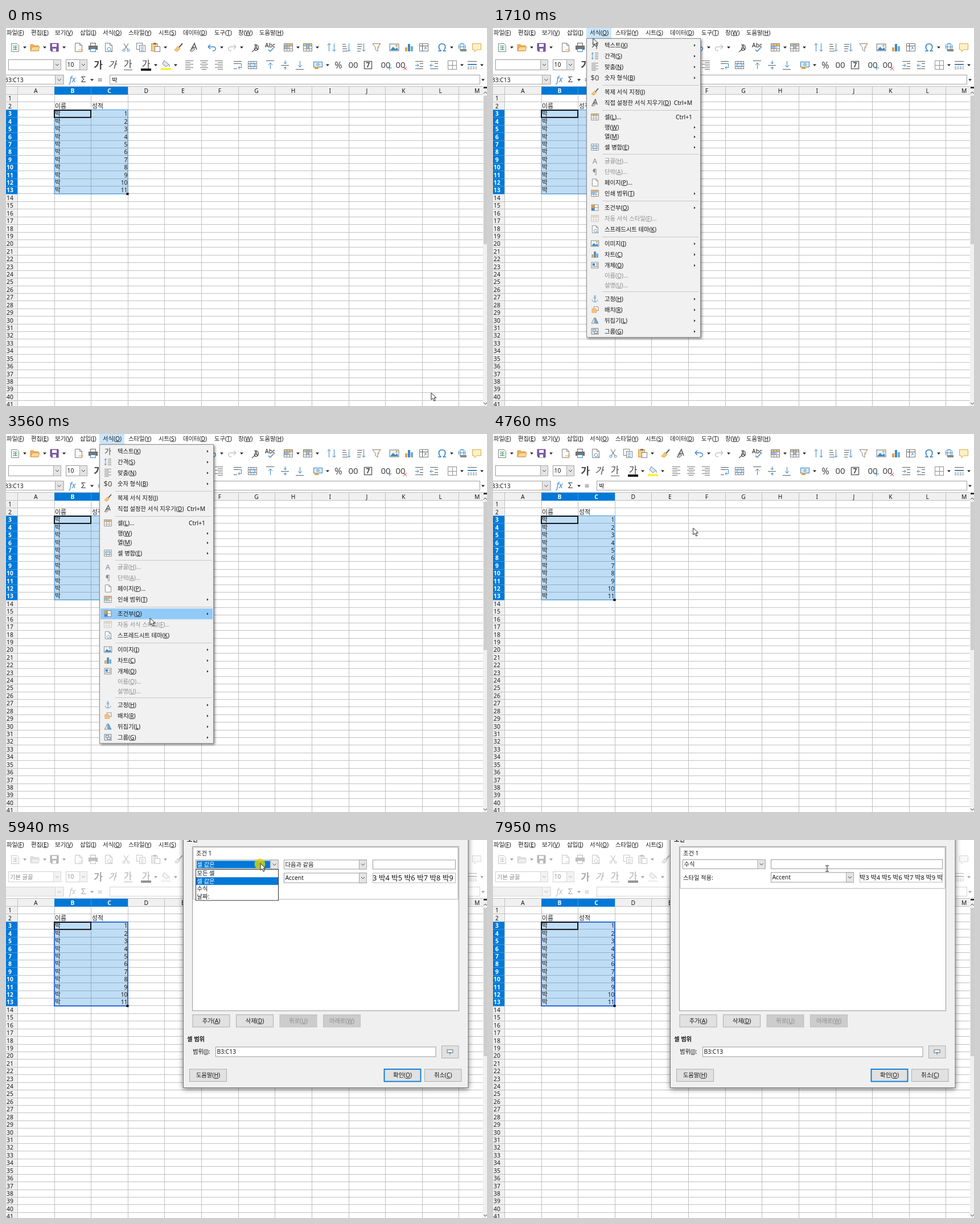
Write an HTML page that moves like this. It is 845 by 663 pixels and loops after 8000 ms.

```html
<!DOCTYPE html>
<html lang="ko">
<head>
<meta charset="utf-8">
<title>조건부 서식</title>
<style>
html, body { margin: 0; width: 845px; height: 663px; overflow: hidden; background: #fff; }
svg { display: block; }
text { font: 10.3px "Noto Sans", "Noto Sans CJK KR", sans-serif; fill: #161616; white-space: pre; }
.u { text-decoration: underline; }
.b { font-weight: 700; }
.w { fill: #fff; }
.dim { fill: #8d8d8d; }
.cell { font-size: 10.8px; }
.mid { text-anchor: middle; }
.end { text-anchor: end; }
.shade { filter: drop-shadow(2px 2px 2px #0007); }

/* every part shares one 8 s clock */
.t { animation: 8s step-end infinite; }
#bar { animation-name: disable; }
#live { animation-name: live; }
#idle { animation-name: idle; }
#thick { animation-name: thick; }
#tab { animation-name: tab; }
#menu { animation-name: menu; }
#hover { animation-name: hover; }
#sub { animation-name: sub; }
#subHover { animation-name: subHover; }
#dialog { animation-name: dialog; animation-timing-function: linear; transform-origin: 561.5px 158px; }
#before { animation-name: before; }
#after { animation-name: after; }
#list { animation-name: list; }
#s0 { animation-name: s0; }
#s1 { animation-name: s1; }
#s2 { animation-name: s2; }
#pointer { animation-name: move; animation-timing-function: linear; }
#click { animation-name: click; }
#arrow { animation-name: arrow; }
#beam { animation-name: beam; }

@keyframes disable { 0% { filter: none } 66%, 100% { filter: grayscale(1) opacity(.45) } }
@keyframes live { 0% { opacity: 1 } 66%, 100% { opacity: 0 } }
@keyframes idle { 0% { opacity: 0 } 66%, 100% { opacity: 1 } }
@keyframes thick { 0% { opacity: 0 } 62.2%, 100% { opacity: 1 } }
@keyframes tab { 0% { opacity: 0 } 13.8% { opacity: 1 } 55.5%, 100% { opacity: 0 } }
@keyframes menu { 0% { opacity: 0 } 17.4% { opacity: 1 } 55.5%, 100% { opacity: 0 } }
@keyframes sub { 0% { opacity: 0 } 48% { opacity: 1 } 55.5%, 100% { opacity: 0 } }
@keyframes subHover { 0% { opacity: 0 } 49.6%, 100% { opacity: 1 } }
@keyframes hover {
  0% { transform: translateY(-99px) }
  22% { transform: translateY(30px) }
  22.8% { transform: translateY(49px) }
  23.2% { transform: translateY(68px) }
  23.5% { transform: translateY(87px) }
  23.9% { transform: translateY(112px) }
  24.2% { transform: translateY(131px) }
  24.5% { transform: translateY(156px) }
  24.8% { transform: translateY(174px) }
  25% { transform: translateY(190px) }
  25.3% { transform: translateY(209px) }
  25.6% { transform: translateY(-99px) }
  26.2% { transform: translateY(271px) }
  26.5% { transform: translateY(290px) }
  26.9% { transform: translateY(315.5px) }
  27.4% { transform: translateY(-99px) }
  28% { transform: translateY(353.5px) }
  28.6% { transform: translateY(-99px) }
  30.2% { transform: translateY(378.5px) }
  32% { transform: translateY(397.5px) }
  35.8% { transform: translateY(378.5px) }
  36.6% { transform: translateY(353.5px) }
  40% { transform: translateY(-99px) }
  44.4%, 100% { transform: translateY(315.5px) }
}
@keyframes dialog {
  0%, 62.3% { opacity: 0; transform: scale(.93) }
  63.6% { opacity: .93; transform: scale(.994) }
  65%, 100% { opacity: 1; transform: none }
}
@keyframes before { 0% { opacity: 1 } 96.37%, 100% { opacity: 0 } }
@keyframes after { 0% { opacity: 0 } 96.37%, 100% { opacity: 1 } }
@keyframes list { 0% { opacity: 0 } 73.1% { opacity: 1 } 96.37%, 100% { opacity: 0 } }
@keyframes s0 { 0% { opacity: 0 } 77.8% { opacity: 1 } 84.7%, 100% { opacity: 0 } }
@keyframes s1 { 0% { opacity: 1 } 77.8% { opacity: 0 } 84.7% { opacity: 1 } 85.5% { opacity: 0 } 90.3% { opacity: 1 } 93.4%, 100% { opacity: 0 } }
@keyframes s2 { 0% { opacity: 0 } 85.5% { opacity: 1 } 90.3% { opacity: 0 } 93.4%, 100% { opacity: 1 } }
@keyframes move {
  0%, .6% { transform: translate(747px, 640px); animation-timing-function: ease-in-out }
  10.25%, 11% { transform: translate(151px, 51px) }
  12.5% { transform: translate(141px, 24px) }
  14.5%, 20% { transform: translate(176px, 13px) }
  21.3% { transform: translate(175px, 16px) }
  23.1% { transform: translate(190px, 60px) }
  25% { transform: translate(225px, 190px) }
  26.9% { transform: translate(248px, 310px) }
  28.7%, 29.2% { transform: translate(253px, 368px) }
  31.1% { transform: translate(253px, 382px) }
  32%, 35% { transform: translate(253px, 391px) }
  37.4%, 39% { transform: translate(253px, 350px) }
  41.4%, 43.7% { transform: translate(253px, 328px) }
  44.45%, 45% { transform: translate(253px, 323px) }
  48% { transform: translate(330px, 319px) }
  52.4%, 55.2% { transform: translate(400px, 316px); animation-timing-function: ease-in-out }
  63%, 65.5% { transform: translate(318px, 60px); animation-timing-function: ease-in-out }
  72%, 76.2% { transform: translate(447px, 41px) }
  79%, 83.6% { transform: translate(447px, 60px) }
  86.1%, 89.2% { transform: translate(447px, 84px) }
  90.8%, 92.3% { transform: translate(447px, 74px) }
  93.9%, 96% { transform: translate(447px, 82px) }
  99.3%, 100% { transform: translate(587px, 50px) }
}
@keyframes click {
  0% { opacity: 0 }
  16.6% { opacity: .8 } 18.4% { opacity: 0 }
  55.5% { opacity: .8 } 57.2% { opacity: 0 }
  73.1% { opacity: .8 } 75.7% { opacity: 0 }
  96.37% { opacity: .8 } 97.2%, 100% { opacity: 0 }
}
@keyframes arrow { 0% { opacity: 1 } 98.4%, 100% { opacity: 0 } }
@keyframes beam { 0% { opacity: 0 } 98.4%, 100% { opacity: 1 } }
</style>
</head>
<body>
<svg id="stage" width="845" height="663" viewBox="0 0 845 663"></svg>
<script>
const INK = '#5c5c5c', BLUE = '#3a87c4', GOLD = '#e5a040', SEL = '#0078d7';

const T = (x, y, s, cls = '', attr = '') =>
  `<text x="${x}" y="${y + 3.7}" class="${cls}" ${attr}>${s.replace(/\((\w)\)/, '(<tspan class="u">$1</tspan>)')}</text>`;
const R = (x, y, w, h, fill, line = 'none', lw = 1) =>
  `<rect x="${x}" y="${y}" width="${w}" height="${h}" fill="${fill}" stroke="${line}" stroke-width="${lw}"/>`;
const P = (d, line = INK, fill = 'none', lw = 1) =>
  `<path d="${d}" stroke="${line}" fill="${fill}" stroke-width="${lw}"/>`;
const at = (x, y, body) => `<g transform="translate(${x} ${y})">${body}</g>`;
const part = (id, body, cls = '') => `<g id="${id}" class="t ${cls}">${body}</g>`;
const drop = (x, y) => P(`M${x - 3} ${y - 1.5}h6l-3 3.4z`, 'none', '#222');
const chevron = (x, y) => P(`M${x - 3} ${y - 1.5}l3 3 3-3`, '#444');
const combo = (x, y, w, h, s, cls) =>
  R(x, y, w, h, '#fff', '#9a9a9a') + R(x + w - 13, y, 13, h, '#e4e4e4', '#a8a8a8') +
  chevron(x + w - 6.5, y + h / 2) + T(x + 2, y + h / 2, s, cls);
const lines = (rows, x = -7) => P(rows.map((w, i) => `M${x < 0 ? x : -w / 2} ${i * 3 - 7.5}h${w}`).join(''), '#777');

const page = P('M-5.5-7.5H2.5L6.5-3.5V7.5H-5.5ZM2.5-7.5V-3.5H6.5', '#808080', '#fcfcfc');
const table = c => R(-7.5, -6.5, 15, 13, '#fff', '#808080') + R(-7, -6, 14, 3.5, c) + P('M-7-2.5H7M-7 2.5H7M-2.5-6V6M2.5-6V6', '#909090');
const arrowDown = P('M4.5-7V7M1.5 4l3 3 3-3', BLUE);
const cells = table('#f0c079');
const icons = {
  sheet: P('M-6.5-6.5H3.5L6.5-3.5V7.5H-6.5Z', '#808080', '#fff') + P('M-4-2.5H4M-4 .5H4M-4 3.5H4M.5-3V5', '#3c9a6b'),
  folder: P('M-8 6V-5H-3L-1-3H6V6Z', '#d8963a', '#eeb45c') + P('M-8 6L-5-1H8L6 6Z', '#d8963a', '#f9d79b'),
  save: P('M-7-7H7V7H-5L-7 5Z', '#65458a', '#7d5ba6') + R(-4, -6, 8, 5, '#fff') + R(-3, 2, 6, 5, '#fff'),
  page,
  send: page + P('M0 4.5H8M5 1.5L8 4.5 5 7.5', GOLD),
  print: R(-4.5, -7.5, 9, 5, '#fff', INK) + R(-7.5, -2.5, 15, 6, '#777', INK) + R(-4.5, 2.5, 9, 5, '#fff', BLUE),
  look: page + P('M1 0a3 3 0 1 0 .1 0M4 5L7 8', BLUE),
  cut: P('M-4-7L3 4M4-7L-3 4') + P('M-6 5a2 2 0 1 0 4 0a2 2 0 1 0-4 0M2 5a2 2 0 1 0 4 0a2 2 0 1 0-4 0', BLUE),
  copy: R(-7.5, -7.5, 10, 11, '#fff', '#808080') + R(-2.5, -3.5, 10, 11, '#fff', '#808080') + P('M-.5-.5H5M-.5 2.5H5M-.5 5.5H5', BLUE),
  paste: R(-7.5, -6.5, 11, 13, '#f6cd8a', '#d8963a') + R(-4, -8, 5, 3, '#777') + R(-1.5, -1.5, 9, 9, '#fff', '#808080'),
  brush: P('M7-7L1 0', INK, 'none', 2) + P('M-1-2L3 2-2 7-7 5Z', GOLD, '#f4c47f'),
  clear: P('M-5 4L1-7 5 4M-2 0H4', INK, 'none', 1.6) + P('M-7 6L-1 1 2 3-3 7Z', INK, '#ddd'),
  undo: P('M-7-1L-3-5M-7-1L-3 3M-7-1H2C8-1 8 6 1 6', BLUE, 'none', 1.4),
  redo: P('M7-1L3-5M7-1L3 3M7-1H-2C-8-1-8 6-1 6', '#c4c4c4', 'none', 1.4),
  find: P('M-3-4A5 5 0 1 1-2 5M-1 3L-7 8', INK, 'none', 1.4) + T(0, 0, 'A', 'mid'),
  spell: T(0, -4, 'Abc', 'mid') + P('M-3 4L0 7 6 1', BLUE, 'none', 1.5),
  cells,
  rows: cells + R(-7, -2, 8, 4, '#8dbde4'),
  cols: cells + R(-2, -6, 4, 8, '#8dbde4'),
  sort: P('M-4.5 7V-7M-7.5-4L-4.5-7-1.5-4', BLUE) + arrowDown,
  asc: P('M-7-5.5H-1M-7-1.5H0M-7 2.5H1M-7 6.5H2') + arrowDown,
  desc: P('M-7-5.5H2M-7-1.5H1M-7 2.5H0M-7 6.5H-1') + arrowDown,
  filter: P('M-7-6.5H7L2 0V7L-2 4V0Z', '#808080', '#fff') + P('M2 3L5-1 3-1 6-6', GOLD),
  image: R(-8, -6, 16, 12, '#eaf4fc', '#777') + P('M-7 5L-2-1 2 3 5 0 7 5Z', 'none', BLUE) + `<circle cx="4" cy="-3" r="1.7" fill="${GOLD}"/>`,
  chart: R(-7, 0, 4, 7, GOLD) + R(-2, -6, 4, 13, BLUE) + R(3, -2, 4, 9, '#70a9d6'),
  pivot: R(-7.5, -6.5, 15, 13, '#fff', '#777') + P('M-7-2.5H7M-2.5-6V7') + P('M0 4L4 0M1 0H4V3', BLUE),
  globe: P('M0-7a6 6 0 1 0 .1 0M-6-1H6M0-7C-4-4-4 2 0 5C4 2 4-4 0-7', BLUE) + R(-3, 3, 11, 4, '#888'),
  note: P('M-7.5-6.5H7.5V4H0L-4 8V4H-7.5Z', '#dda83d', '#fdf1c8'),
  left: lines([14, 9, 14, 9, 14, 9]),
  center: lines([14, 9, 14, 9, 14, 9], 0),
  right: `<g transform="scale(-1 1)">${lines([14, 9, 14, 9, 14, 9])}</g>`,
  wrap: P('M-7-6.5H7M-7-2.5H2M-7 6.5H-1') + P('M2-2.5H6.5V4.5H1M4 1.5L1 4.5 4 7.5', BLUE),
  merge: R(-7.5, -6.5, 15, 13, '#fff', '#808080') + P('M-7-2.5H7M-7 2.5H7M-2.5-6V-3M2.5-6V-3M-2.5 3V6M2.5 3V6', '#808080') + R(-4.5, -2.5, 9, 5, '#d7e9f8', BLUE),
  top: P('M-7-7.5H7') + P('M.5 7V-4M-3 0L.5-4 4 0', BLUE),
  middle: P('M-7 .5H7') + P('M.5-8V-2M-2-5L.5-2 3-5M.5 8V3M-2 6L.5 3 3 6', BLUE),
  bottom: P('M-7 7.5H7') + P('M.5-7V4M-3 0L.5 4 4 0', BLUE),
  money: R(-7.5, -5.5, 15, 9, '#d7e9f8', BLUE) + P('M0-3a2 2 0 1 0 .1 0', BLUE) + R(-6, 3, 7, 4, GOLD),
  indent: P('M-7-6.5H7M1-2.5H7M1 2.5H7M-7 6.5H7') + P('M-7 .5H-1M-4-2.5L-1 .5-4 3.5', BLUE),
  outdent: P('M-7-6.5H7M1-2.5H7M1 2.5H7M-7 6.5H7') + P('M-7 .5H-1M-4-2.5L-7 .5-4 3.5', BLUE),
  border: R(-7.5, -7.5, 15, 15, '#fff', '#909090') + P('M.5-7V7M-7 .5H7', '#909090'),
  dash: P('M-8-6.5H8') + P('M-8-1H8', BLUE, 'none', 2) + `<path d="M-8 3.5H8M-8 6.5H8" stroke="${INK}" stroke-dasharray="3 1.5"/>`,
  spacing: P('M0-6H7M0-2H7M0 2H7M0 6H7') + P('M-5-7V7M-7-4L-5-7-3-4M-7 4L-5 7-3 4', BLUE),
  anchor: P('M0-4V7M-3-2H3M-6 2C-6 8 6 8 6 2M0-7a1.5 1.5 0 1 0 .1 0', BLUE),
  stack: R(-2, -6, 9, 8, '#fff', '#777') + R(-6, -2, 9, 8, '#f4c47f', GOLD),
  flip: P('M-1-6V6H-7Z', '#777', '#eee') + P('M1-6V6H7Z', BLUE, '#6aa9dc'),
  group: R(-7, -6, 14, 12, 'none', '#666') + R(-4, -4, 6, 5, '#d7e9f8', BLUE) + R(-1, 0, 6, 4, '#fff', INK),
  cond: R(-7, -6, 14, 12, '#fff', '#777') + R(-7, -6, 6, 6, GOLD) + R(-7, 1, 6, 5, BLUE) + P('M-7 0H7M-1-6V6', '#777'),
  object: R(-7, -6, 14, 12, '#fff', '#777') + R(-5, -4, 5, 5, BLUE) + P('M2-3H6M2 0H6M-5 3H6')
};
const icon = (name, x, y) => at(x, y, icons[name]);

// spreadsheet
const colX = i => 20 + i * 64.62, rowY = n => 117 + (n - 1) * 13.42;
function sheet() {
  let s = R(0, 103, 838, 14, '#f0f0f0') + R(0, 103, 20, 560, '#f0f0f0');
  for (let i = 0; i < 13; i++) s += R(Math.round(colX(i)), 103, 1, 560, '#c0c0c0');
  for (let n = 1; n < 42; n++) s += R(0, Math.round(rowY(n)) - 1, 838, 1, '#c0c0c0');
  s += R(0, 102, 838, 1, '#c0c0c0');
  s += R(85, 103, 129, 14, SEL) + R(149, 103, 1, 14, '#3d97e0') + R(0, rowY(3), 20, rowY(14) - rowY(3), SEL);
  for (let i = 0; i < 13; i++) {
    s += T(colX(i) + 32.3, 110, 'ABCDEFGHIJKLM'[i], 'mid' + (i == 1 || i == 2 ? ' b w' : ''));
  }
  for (let n = 1; n < 42; n++) {
    const on = n > 2 && n < 14;
    if (on) s += R(0, Math.round(rowY(n)) - 1, 20, 1, '#3d97e0');
    s += T(7, rowY(n) + 6.7, '' + n, 'mid' + (on ? ' b w' : ''));
  }
  s += T(86, 137, '이름', 'cell') + T(151, 137, '성적', 'cell');
  s += `<g opacity=".25">${R(85, 144, 129, 147, SEL)}</g>`;
  for (let n = 1; n < 12; n++) {
    const y = rowY(n + 2) + 6.7;
    s += T(86, y, '박', 'cell') + T(213.5, y, '' + n, 'end');
  }
  s += R(85, 143.5, 129, 147.5, 'none', '#3d92d8') +
    part('thick', R(85, 144, 129, 147, 'none', '#2560d4', 1.8)) +
    R(85, 144.2, 64, 12.6, 'none', '#000', 1.8) + R(211.5, 289, 4, 4, '#000');
  return s + R(838, 103, 7, 560, '#f0f0f0') + R(839, 119, 6, 260, '#cdcdcd') + R(839, 103, 6, 3, '#333') +
    P('M839 115l3-3 3 3M839 657l3 3 3-3', '#444');
}

function toolbar() {
  const first = {
    sheet: 16, folder: 51, save: 85, send: 127, print: 153, look: 180, cut: 211, copy: 237, paste: 263,
    brush: 303, clear: 330, undo: 362, redo: 397, find: 439, spell: 464, rows: 496, cols: 530, sort: 572,
    asc: 598, desc: 624, filter: 651, image: 682, chart: 708, pivot: 734, globe: 801, note: 827
  };
  const second = {
    left: 322, center: 348, right: 374, wrap: 407, merge: 433, top: 464, middle: 490, bottom: 516,
    money: 548, indent: 726, outdent: 752, border: 784, dash: 819
  };
  const row = (set, y) => Object.entries(set).map(([k, x]) => icon(k, x, y)).join('');
  const big = (x, y, s, size, extra = '') =>
    T(x, y + size * .36 - 3.7, s, 'mid', `style="font-size:${size}px;fill:#444;${extra}"`);
  let s = row(first, 34) + row(second, 65) + big(766, 34, 'Ω', 20, 'fill:' + BLUE);
  s += [33, 68, 102, 280, 379, 414, 513, 547, 783].map(x => drop(x, 34)).join('');
  s += [263, 298, 565, 801, 836].map(x => drop(x, 65)).join('');
  s += combo(4.5, 55.5, 92, 18, '') + combo(105.5, 55.5, 37, 18, '10');
  s += big(162, 64.5, '가', 17, 'font-weight:700') + at(188, 64.5, `<g transform="skewX(-14)">${big(0, 0, '가', 16)}</g>`) +
    big(214, 63, '가', 16) + R(207, 73, 15, 1, INK) + big(246, 63, '가', 16) + R(237, 71, 18, 4, '#111');
  s += at(281, 63, P('M-3-6L5 1 0 5-6 0Z', '#808080', '#d7e9f8') + P('M6 1V5', BLUE)) + R(272, 70, 18, 4, '#ffef3a');
  s += big(584, 65, '%', 16) + big(610, 65, '00', 15) + R(629.5, 58.5, 13, 13, '#fff', INK, 1.4) + big(636, 65, '7', 12, 'font-weight:700');
  s += big(667, 65, '00', 15) + P('M674 66v8M670 70h8', BLUE) + big(693, 65, '00', 15) + P('M698 68l6 6M704 68l-6 6', '#d04a3a');
  s += R(-2, 82.5, 103, 16, '#fff', '#a0a0a0') + R(86.5, 82.5, 14.5, 16, '#e4e4e4', '#a8a8a8') + chevron(93.5, 91) +
    big(117, 90, 'fx', 14, `font-style:italic;fill:${BLUE}`) + big(136, 90, 'Σ', 15) + drop(151, 91) + big(165, 91, '=', 15) +
    R(182.5, 82.5, 650, 16, '#fff', '#a0a0a0') + drop(838, 91);
  return s;
}

const tabs = { '파일(F)': 1, '편집(E)': 44, '보기(V)': 86, '삽입(I)': 130, '서식(O)': 170, '스타일(Y)': 215, '시트(S)': 268, '데이터(D)': 311, '도구(T)': 366, '창(W)': 408, '도움말(H)': 445 };
const menuBar = () => part('tab', R(164, 0, 44, 18, '#c9e6fb')) +
  Object.entries(tabs).map(([s, x]) => T(x, 8, s)).join('');

// [centre y, label, icon, flag]: > opens a submenu, - is disabled
const items = [
  [30, '텍스트(X)', '', '>'], [49, '간격(S)', 'spacing', '>'], [68, '맞춤(N)', 'left', '>'], [87, '숫자 형식(B)', '', '>'],
  [112, '복제 서식 지정(J)', 'brush'], [131, '직접 설정한 서식 지우기(D)', 'clear', 'Ctrl+M'],
  [156, '셀(L)...', 'cells', 'Ctrl+1'], [174, '행(W)', '', '>'], [190.5, '열(M)', '', '>'], [209, '셀 병합(E)', 'merge', '>'],
  [233, '글꼴(H)...', '', '-'], [252, '단락(A)...', '', '-'], [271, '페이지(P)...', 'page'], [290, '인쇄 범위(T)', 'rows', '>'],
  [315, '조건부(O)', 'cond', '>'], [334, '자동 서식 스타일(F)...', 'cells', '-'], [353, '스프레드시트 테마(K)', 'look'],
  [378, '이미지(I)', 'image', '>'], [397, '차트(C)', 'chart', '>'], [416, '개체(O)', 'object', '>'],
  [434, '이름(Q)...', '', '-'], [451, '설명(U)...', '', '-'],
  [475, '고정(H)', 'anchor', '>'], [494, '배치(R)', 'stack', '>'], [513, '뒤집기(L)', 'flip', '>'], [532, '그룹(G)', 'group', '>']
];
const rule = (x, y, w) => R(x, y, w, 1, '#c8c8c8');
function menu() {
  let s = `<g class="shade">${R(164.5, 18.5, 200, 524, '#f1f1f1', '#8c8c8c')}</g>` +
    part('hover', R(166, -9.5, 197, 19, '#91c9f7'));
  s += [100, 144, 221, 303, 366, 462].map(y => rule(192, y, 170)).join('');
  for (const [y, label, pic, flag = ''] of items) {
    const off = flag == '-';
    s += T(196, y, label, off ? 'dim' : '');
    if (pic) s += `<g opacity="${off ? .4 : 1}" transform="translate(179 ${y}) scale(.84)">${icons[pic]}</g>`;
    if (flag == '>') s += P(`M353 ${y - 1.8}v4.4l2.7-2.2z`, 'none', '#222');
    if (flag[0] == 'C') s += T(350, y, flag, 'end');
  }
  const glyph = (y, c, cls = '') => T(179, y + 1, c, 'mid ' + cls, `style="font-size:13px${cls ? '' : ';fill:#444'}"`);
  return s + glyph(30, '가') + glyph(87, '$0') + glyph(233, 'A', 'dim') + glyph(252, '¶', 'dim');
}
const subMenu = () => `<g class="shade">${R(363.5, 304.5, 119, 119, '#f1f1f1', '#8c8c8c')}</g>` +
  part('subHover', R(365, 306, 116, 19, '#91c9f7')) + rule(390, 402, 90) +
  ['조건(C)...', '색상 척도(S)...', '데이터 막대(D)...', '아이콘 세트(I)...', '날짜(T)...', '관리(M)...']
    .map((s, i) => T(394, 315 + i * 19 + (i > 4 ? 3 : 0), s)).join('');

function button(x, y, w, s, kind = '') {
  const off = kind == 'off';
  return R(x, y, w, 21.5, off ? '#cccccc' : '#e1e1e1', kind == 'main' ? SEL : off ? '#bfbfbf' : '#adadad', kind == 'main' ? 1.8 : 1) +
    T(x + w / 2, y + 10.7, s, 'mid' + (off ? ' dim' : ''));
}
function dialog() {
  const edit = (x, y, w, h) => R(x, y, w, h, '#fff', '#9a9a9a');
  const sample = (s, size) => R(644.5, 58, 145, 17, '#fff', '#b8b8b8') +
    `<g clip-path="url(#sample)">${T(644, 67, s, '', `style="font-size:${size}px"`)}</g>`;
  let s = `<g style="filter:drop-shadow(0 2px 5px #0008)">${R(311.5, -40, 500.5, 474.5, '#f0f0f0', '#777')}</g>` +
    T(318, -1, '조건', 'b') + R(327.5, 11.5, 468, 288, '#fff', '#9a9a9a');
  s += T(334, 23, '조건 1');
  s += part('before', P('M329 104V13H794V104Z', '#b0b0b0') +
    combo(333.5, 35, 144.5, 16, '') + R(335, 36.5, 129, 13, SEL) + T(335.5, 43, '셀 값은', 'w') +
    combo(488.5, 35, 145, 16, '다음과 같음') + edit(644.5, 35, 145, 16) + T(334, 67, '스타일 적용(F):') +
    combo(488.5, 58, 145, 17, 'Accent') + sample('3 박4 박5 박6 박7 박8 박9', 12.8) + T(334, 88, '값을 입력하십시오(G):'));
  s += part('after', P('M329 85V13H794V85Z', '#b0b0b0') +
    combo(333.5, 34.5, 144.5, 16, '수식') + edit(488.5, 34.5, 301, 16) + T(334, 66, '스타일 적용:') +
    combo(488.5, 57, 145, 17, 'Accent') + at(0, -1, sample('박3 박4 박5 박6 박7 박8 박9 박', 11.1)));
  s += button(328, 306.5, 65, '추가(A)') + button(404.5, 306.5, 65, '삭제(D)') +
    button(481, 306.5, 65, '위로(U)', 'off') + button(557.5, 306.5, 65, '아래로(W)', 'off') +
    T(318, 349, '셀 범위', 'b') + T(328, 371.5, '범위(J):') + edit(368.5, 363, 386.5, 17) + T(370.5, 371.5, 'B3:C13') +
    button(765.5, 361, 29.5, '') + R(775, 368, 10, 5, '#fff', '#666') + P('M780 377v-5M778 374l2-2 2 2', BLUE) +
    button(322.5, 402, 65, '도움말(H)') + button(664.5, 402, 64, '확인(O)', 'main') + button(735.5, 402, 64.5, '취소(C)');
  const names = ['모든 셀', '셀 값은', '수식', '날짜:'];
  s += part('list', R(333.5, 51.5, 145, 54.5, '#fff', '#333') + names.map((n, i) => {
    const y = 58.5 + i * 13.5;
    return T(335.5, y, n) + (i < 3 ? part('s' + i, R(334, y - 6.7, 144, 13.5, SEL) + T(335.5, y, n, 'w')) : '');
  }).join(''));
  return s;
}

const pointer = `<circle id="click" class="t" cx="-1" cy="1" r="9.5" fill="#ddd70a"/>` +
  part('arrow', P('M0 0V12L2.9 9.4 5 14.2 7.2 13.2 5.1 8.6H9Z', '#222', '#fff', 1)) +
  part('beam', P('M-3-5H3M-3 5H3M0-5V5', '#222', 'none', 1));

document.getElementById('stage').innerHTML =
  `<clipPath id="sample">${R(644, 56, 145, 20, '#000')}</clipPath>` +
  sheet() + menuBar() + part('bar', toolbar()) +
  part('live', T(-3, 91, 'B3:C13') + T(186, 91, '박')) +
  part('idle', R(0, 83, 86, 15, '#f0f0f0') + T(7, 65, '기본 글꼴', 'dim')) +
  part('menu', menu()) + part('sub', subMenu()) + part('dialog', dialog()) + part('pointer', pointer);
</script>
</body>
</html>
```
